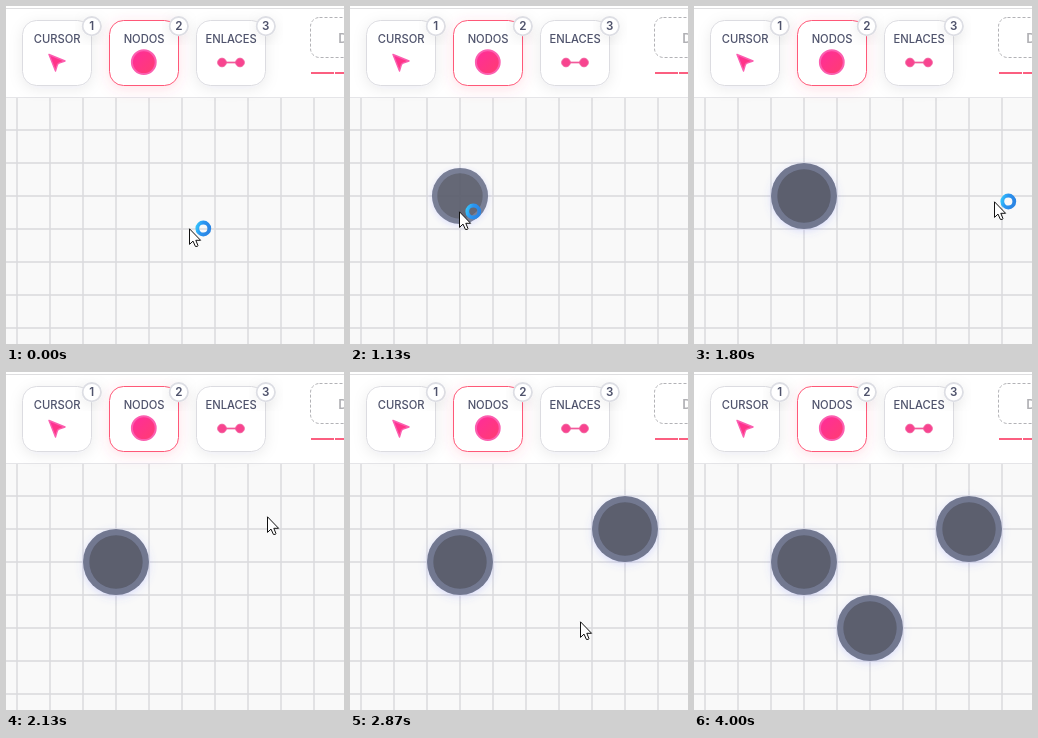
An HTML page for the animation above (4.39 s loop, 338 by 338 pixels).

```html
<!DOCTYPE html>
<html lang="es">
<head>
<meta charset="utf-8">
<title>Editor de nodos</title>
<style>
  html, body { margin: 0; width: 100%; height: 100%; overflow: hidden; background: #fff; }
  svg { display: block; width: 100vw; height: 100vh; }
  text { font-family: Inter, Roboto, sans-serif; text-anchor: middle; fill: #4f536c; }
  .label { font-size: 11.2px; font-weight: 500; }
  .badge { font-size: 11.6px; font-weight: 600; }
</style>
</head>
<body>
<svg viewBox="0 0 338 338" xmlns="http://www.w3.org/2000/svg">
  <defs>
    <filter id="soft" x="-40%" y="-40%" width="180%" height="190%">
      <feDropShadow dx="0" dy="3" stdDeviation="7" flood-color="#1e2030" flood-opacity=".08"/>
    </filter>
    <filter id="rosy" x="-40%" y="-40%" width="180%" height="190%">
      <feDropShadow dx="0" dy="3" stdDeviation="7" flood-color="#ff4d6d" flood-opacity=".17"/>
    </filter>
    <filter id="glow" x="-40%" y="-40%" width="180%" height="180%">
      <feDropShadow dx="0" dy="2" stdDeviation="4" flood-color="#5566ff" flood-opacity=".2"/>
    </filter>
    <linearGradient id="pink" x1="0" y1="0" x2="1" y2="1">
      <stop offset="0" stop-color="#ff2c9c"/>
      <stop offset="1" stop-color="#ff3d70"/>
    </linearGradient>
    <linearGradient id="busy" x1="0" y1="0" x2="1" y2=".3">
      <stop offset="0" stop-color="#35c3fb"/>
      <stop offset=".45" stop-color="#2a96f2"/>
      <stop offset="1" stop-color="#2b86e4"/>
    </linearGradient>
  </defs>

  <rect width="338" height="338" fill="#fff"/>
  <rect y="91" width="338" height="247" fill="#f9f9f9"/>
  <path id="grid" fill="none" stroke="#dadadd" stroke-width="1.5"/>
  <path d="M0 91.5H338" stroke="#e5e5e8"/>
  <path d="M0 2.5H338" stroke="#dedee0"/>

  <g id="tools"></g>
  <g fill="url(#pink)" stroke="#fb5fb0" stroke-linejoin="round">
    <path d="M43 48.5L59 55L53 57.2Q51.6 57.8 51.2 59.3L49.5 65Z" stroke-width="1.4"/>
    <circle cx="137.8" cy="56.2" r="11.9" stroke-width="2"/>
    <g fill="#f8448f" stroke="#f25a9b">
      <path d="M216 56.5H234" stroke-width="1.7"/>
      <circle cx="216" cy="56.5" r="4.3"/>
      <circle cx="234" cy="56.5" r="4.3"/>
    </g>
  </g>

  <rect x="304.5" y="11.5" width="90" height="40" rx="9" fill="#fff" stroke="#b2b2b6" stroke-dasharray="3 2"/>
  <text x="337" y="37" font-size="13" font-weight="600" style="fill:#b0b0b4">D</text>
  <path d="M305 67H328M329 67H338" stroke="#fb5f80" stroke-width="2"/>

  <g id="nodes"></g>
  <g id="pointer">
    <circle id="ring" cx="14.3" cy=".5" r="6" fill="none" stroke="url(#busy)" stroke-width="3.8"/>
    <path d="M.5 .8V16.4L4 13.1L6.4 18.4H8.4L8.9 17.4L6.8 12.3H11.6Z" fill="#fff" stroke="#111"/>
  </g>
</svg>
<script>
const LOOP = 4390, STEP = 200 / 3, CELL = 33;
const NS = "http://www.w3.org/2000/svg";
const $ = id => document.getElementById(id);

function add(parent, tag, attrs, text) {
  const el = document.createElementNS(NS, tag);
  for (const key in attrs) el.setAttribute(key, attrs[key]);
  if (text) el.textContent = text;
  parent.appendChild(el);
  return el;
}

const column = i => 11 + CELL * i;
const row = i => 91 + CELL * i;

let lines = "";
for (let i = 0; i < 10; i++) lines += `M${column(i)} 91V338`;
for (let i = 1; i < 8; i++) lines += `M0 ${row(i)}H338`;
$("grid").setAttribute("d", lines);

["CURSOR", "NODOS", "ENLACES"].forEach((name, i) => {
  const tools = $("tools"), x = 16.5 + 87 * i, active = i === 1;
  add(tools, "rect", {
    x, y: 14.5, width: 69, height: 65, rx: 14, fill: "#fff",
    stroke: active ? "#ff5878" : "#dcdce1",
    filter: active ? "url(#rosy)" : "url(#soft)"
  });
  add(tools, "text", { x: x + 34.6, y: 37, class: "label" }, name);
  add(tools, "circle", {
    cx: x + 69.3, cy: 20.2, r: 9.2, fill: "#fff",
    stroke: "#dddee4", "stroke-width": 1.8, filter: "url(#soft)"
  });
  add(tools, "text", { x: x + 69.3, y: 24.3, class: "badge" }, String(i + 1));
});

// Nodes sit on grid crossings and pop in over one step.
const nodes = [[3, 3, 1130], [8, 2, 2330], [5, 5, 3530]].map(([col, line, born]) => {
  const el = add($("nodes"), "g", { filter: "url(#glow)" });
  add(el, "circle", { r: 33, fill: "#727890" });
  add(el, "circle", { r: 26.7, fill: "#5b5e6e" });
  return { el, x: column(col), y: row(line), born };
});

const linear = u => u;
const easeOut = u => 1 - (1 - u) ** 2;
const easeInOut = u => u * u * (3 - 2 * u);

// Each hand movement is an eased Bezier curve.
const moves = [
  { from: 0, to: 670, ease: linear, curve: [[183, 222], [155, 190], [126, 243], [109, 204.5]] },
  { from: 1330, to: 1800, ease: easeInOut, curve: [[109, 205], [200, 210], [300, 195]] },
  { from: 1800, to: 2130, ease: easeOut, curve: [[300, 195], [297, 172], [261, 144]] },
  { from: 2670, to: 3130, ease: easeOut, curve: [[261, 144], [274, 249], [182, 272]] },
  { from: 3730, to: 4000, ease: linear, curve: [[182, 272], [90, 345]] }
];

const mix = (a, b, u) => a.map((v, i) => v + (b[i] - v) * u);

function bezier(points, u) {
  if (points.length === 1) return points[0];
  return bezier(points.slice(1).map((p, i) => mix(points[i], p, u)), u);
}

function tipAt(t) {
  const { from, to, ease, curve } = moves.filter(m => m.from <= t).pop();
  return bezier(curve, ease(Math.min(1, (t - from) / (to - from))));
}

// The picture is held in steps, rounded to 10 ms.
function hold(t) {
  const at = n => 10 * Math.round(n * STEP / 10);
  const n = Math.round(t / STEP);
  return at(n) <= t ? at(n) : at(n - 1);
}

function draw(ms) {
  const t = hold(ms % LOOP);
  const [tipX, tipY] = tipAt(t).map(Math.round);
  $("pointer").setAttribute("transform", `translate(${tipX} ${tipY})`);
  $("ring").setAttribute("opacity", t < 2130 ? 1 : 0);
  for (const { el, x, y, born } of nodes) {
    const popping = t < born + 70;
    el.setAttribute("transform", `translate(${x} ${y}) scale(${popping ? 0.85 : 1})`);
    el.setAttribute("opacity", t < born ? 0 : popping ? 0.94 : 1);
  }
}

const start = performance.now();
function tick() {
  draw(performance.now() - start);
  requestAnimationFrame(tick);
}
draw(0);
requestAnimationFrame(tick);
</script>
</body>
</html>
```
